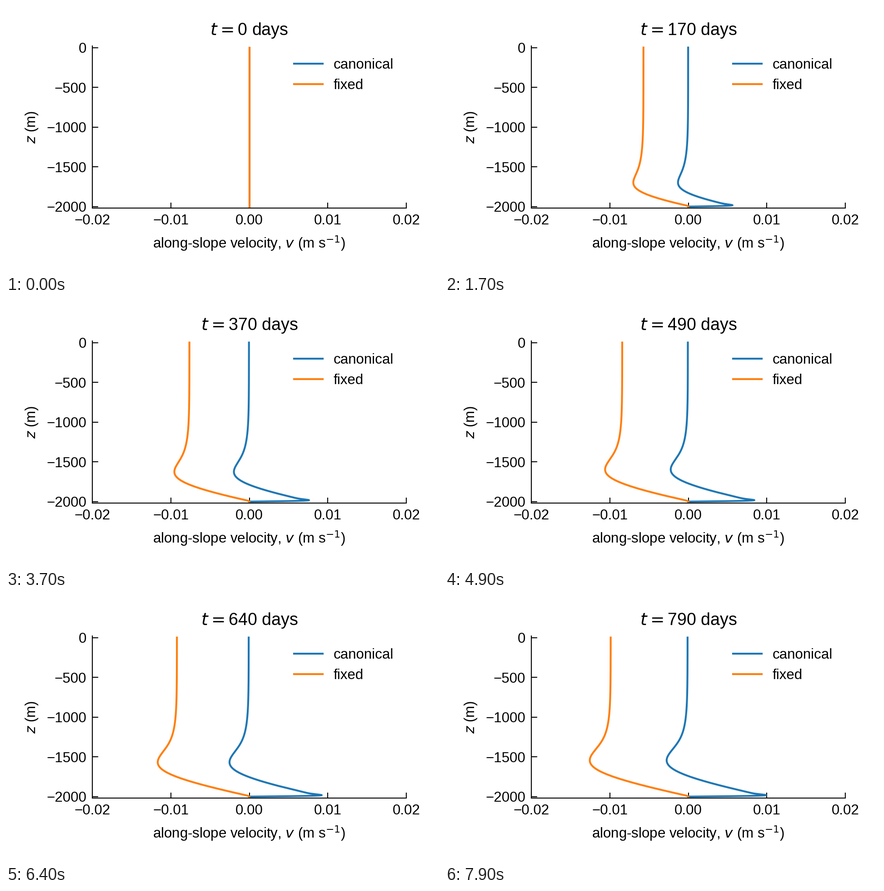
Animation, 953 px wide and 588 px high, one loop 8 s. Source, as a matplotlib script:

```python
import numpy as np
import matplotlib.pyplot as plt
from matplotlib.animation import FuncAnimation
from matplotlib.lines import Line2D

W, H, DPI = 953, 588, 288
PX = 72 / DPI                      # points per pixel
BLUE, ORANGE = "#1f77b4", "#ff7f0e"
FRAMES, DAYS = 80, 10              # days per frame

plt.rcParams.update({
    "font.family": "Liberation Sans",
    "font.size": 31.25 * PX,
    "axes.linewidth": 2.08 * PX,
    "axes.unicode_minus": True,
    "mathtext.fontset": "dejavusans",
})

# Bottom-enhanced mixing over a sloping sea floor
DEPTH, CELLS = 2000.0, 400
K0, K1, SCALE = 6e-5, 2e-3, 200.0
SHEAR = 1e-6 * 2.5e-3 / 5.5e-5     # N^2 * slope / f
EKMAN = np.sqrt(2 * (K0 + K1) / 5.5e-5)
DAY = 86400


def stratification():
    """Diffuse the stratification; return height knots and one profile per frame."""
    dh = DEPTH / CELLS
    dt = DAY / 4
    faces = np.linspace(0, DEPTH, CELLS + 1)
    kappa = K0 + K1 * np.exp(-faces / SCALE)
    kappa[0] = 0                   # no flux through the floor
    inner = kappa[1:-1] / dh**2
    lap = np.diag(inner, 1) + np.diag(inner, -1)
    lap -= np.diag(lap.sum(axis=1))
    step = np.linalg.inv(np.eye(CELLS) - dt * lap)
    source = dt * np.diff(kappa) / dh

    knots = np.concatenate(([0], faces[:-1] + dh / 2, [DEPTH]))
    b = np.zeros(CELLS)
    profiles = [np.zeros(CELLS + 2)]
    for _ in range(FRAMES - 1):
        for _ in range(DAYS * 4):
            b = step @ (b + source)
        profiles.append(np.concatenate(([b[0] + dh / 2], b, [b[-1]])))
    return knots, profiles


knots, profiles = stratification()
height = DEPTH * np.linspace(0, 1, 500) ** 2
spiral = np.exp(-height / EKMAN) * np.cos(height / EKMAN)


def no_slip(flow):
    return SHEAR * (flow - flow[0] * spiral)


def velocities(i):
    if i == 0:
        return np.zeros_like(height), np.zeros_like(height)
    b = np.interp(height, knots, profiles[i])
    drift = K0 * i * DAYS * DAY / DEPTH      # keeps the depth mean at zero
    return no_slip(b - drift), no_slip(b - drift - b[0] + EKMAN)


fig = plt.figure(figsize=(W / DPI, H / DPI), dpi=DPI, facecolor="white")


def label(x, y, text, size=31.25, **kw):
    return fig.text(x / W, 1 - y / H, text, fontsize=size * PX,
                    va="baseline", **kw)


left, right, top, bottom = 189.6, 881.4, 88.0, 445.3
ax = fig.add_axes([left / W, 1 - bottom / H, (right - left) / W, (bottom - top) / H])
ax.set_facecolor("none")
ax.set_xlim(-0.02, 0.02)
ax.set_ylim(-2020, 20)
ax.set_xticks([-0.02, -0.01, 0, 0.01, 0.02])
ax.set_yticks(range(-2000, 1, 500))
ax.tick_params(direction="in", length=12.5 * PX, width=2.08 * PX, pad=12.5 * PX)
ax.spines[["top", "right"]].set_visible(False)

title = label(535.4, 64, "", 37.5, ha="center")
label(535, 533, "along-slope velocity, $v$ (m s$^{-1}$)", ha="center")
label(65, 266.8, "$z$ (m)", ha="center", rotation=90, rotation_mode="anchor")

stroke = dict(lw=4.17 * PX, solid_capstyle="projecting")
for y, name, color in ((126.7, "canonical", BLUE), (172, "fixed", ORANGE)):
    fig.add_artist(Line2D([634 / W, 696.5 / W], [1 - y / H] * 2, color=color, **stroke))
    label(720.4, y + 11, name)

lines = [ax.plot([], [], color=c, **stroke)[0] for c in (BLUE, ORANGE)]


def draw(i):
    for line, v in zip(lines, velocities(i)):
        line.set_data(v, height - DEPTH)
    title.set_text(f"$t = ${i * DAYS} days")
    return [*lines, title]


anim = FuncAnimation(fig, draw, frames=FRAMES, interval=100,
                     repeat=True, repeat_delay=0, blit=False)
plt.show()
```
